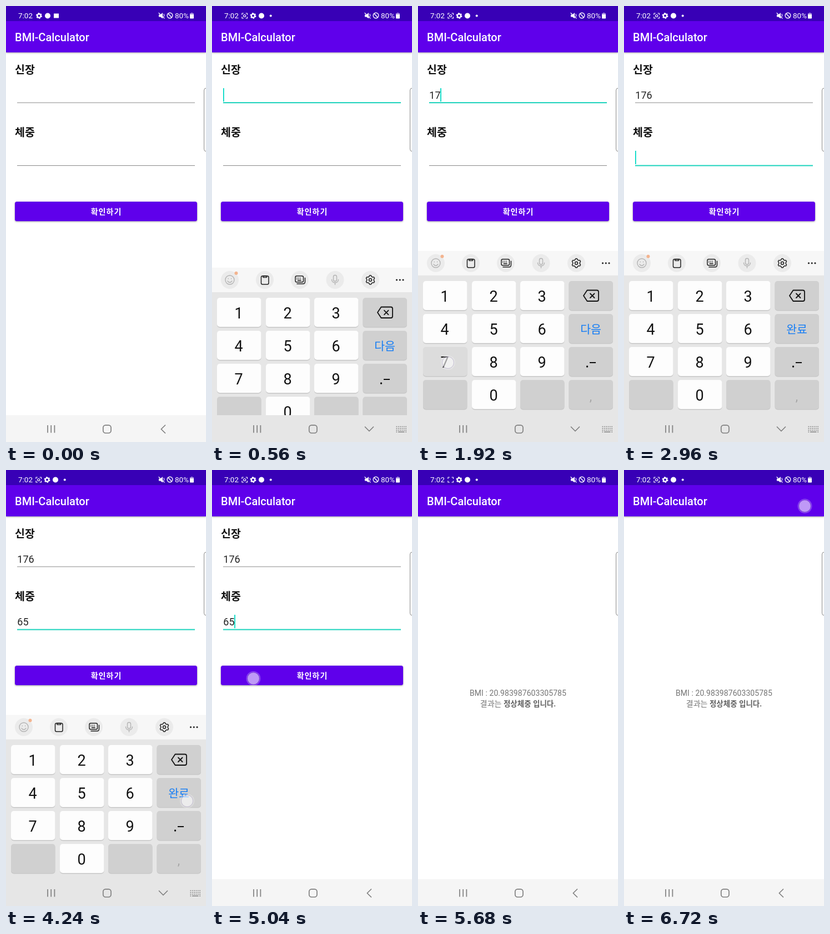
Recreate the animation shown at these times as an HTML page. Size 360x780 px, loop 6960 ms.

```html
<!DOCTYPE html>
<html lang="ko">
<head>
<meta charset="utf-8">
<title>BMI-Calculator</title>
<style>
  html, body { margin: 0; width: 100%; height: 100%; overflow: hidden; background: #fff; }
  svg { display: block; width: 100vw; height: 100vh; }
  text { font-family: Roboto, 'Noto Sans CJK KR', 'Noto Sans CJK JP', 'Noto Sans CJK', sans-serif; }
  .ko { font-family: 'Noto Sans CJK KR', 'Noto Sans CJK JP', 'Noto Sans CJK', sans-serif; }
  .mid { text-anchor: middle; }
  .title { font-size: 20px; font-weight: 500; fill: #fff; }
  .label { font-size: 19.5px; font-weight: 700; fill: #111; }
  .input { font-size: 18px; fill: #222; }
  .status text { font-size: 13.5px; fill: #fff; }
  .digit { font-size: 27px; fill: #111; }
  .result { font-size: 14px; fill: #757575; }
  .line { fill: none; stroke: currentColor; stroke-linecap: round; stroke-linejoin: round; }
  .bar { filter: drop-shadow(0 1px 1.5px rgba(0, 0, 0, .35)); }
</style>
</head>
<body>
<svg viewBox="0 0 360 780" preserveAspectRatio="none">
  <defs>
    <g id="gear">
      <circle r="3.2" fill="none" stroke="#fff" stroke-width="2.4"/>
      <circle r="4.7" fill="none" stroke="#fff" stroke-width="1.6" stroke-dasharray="2.46"/>
    </g>
    <g id="header">
      <rect class="bar" y="27" width="360" height="56" fill="#5f00eb"/>
      <rect width="360" height="27" fill="#3800b6"/>
      <text class="title" x="16" y="62.5">BMI-Calculator</text>
    </g>
  </defs>

  <rect width="360" height="780" fill="#fff"/>

  <g id="form">
    <use href="#header"/>
    <text class="ko label" x="16" y="120.5">신장</text>
    <text class="ko label" x="16" y="233">체중</text>
    <path id="line0" d="M20 173H340"/>
    <path id="line1" d="M20 285.5H340"/>
    <text class="input" id="value0" x="20.3" y="166"></text>
    <text class="input" id="value1" x="20.3" y="278"></text>
    <rect id="caret" width="1.8" height="24" fill="#03dac5"/>
    <rect class="bar" x="16" y="350" width="328" height="35" rx="3.5" fill="#5f00eb"/>
    <text class="ko mid" x="180.6" y="373" font-size="14" font-weight="700" letter-spacing="1.1" fill="#fff">확인하기</text>
  </g>

  <g id="result">
    <rect width="360" height="732" fill="#fff"/>
    <use href="#header"/>
    <text class="result mid" x="180" y="403.5" letter-spacing=".06">BMI : 20.983987603305785</text>
    <text class="result mid" x="180" y="422.5">결과는 <tspan font-size="13.5" font-weight="700" fill="#616161">정상체중 입니다.</tspan></text>
  </g>

  <path d="M361 147H360Q356.500 147 356.500 151V256Q356.500 260 360 260H361" fill="#fff" stroke="#8a8a8a"/>

  <g class="status">
    <text x="22" y="21.700">7:02</text>
    <g id="iconsBefore">
      <use href="#gear" x="59.500" y="17.500"/>
      <circle cx="75" cy="17.500" r="5" fill="#fff"/>
      <rect x="86" y="13.500" width="9" height="8" fill="#fff"/>
    </g>
    <g id="iconsAfter">
      <path class="line" color="#fff" stroke-width="1.200" d="M54 15.500V13H56.500M61 13H63.500V15.500M63.500 19.500V22H61M56.500 22H54V19.500"/>
      <circle id="recDot" cx="58.700" cy="17.500" r="2" fill="none" stroke="#fff" stroke-width="1.200"/>
      <use href="#gear" x="74" y="17.500"/>
      <circle cx="89" cy="17.500" r="5" fill="#fff"/>
      <circle cx="105.700" cy="17.500" r="2" fill="#fff"/>
    </g>
    <path d="M275 15.500H278L282 12V22.500L278 19.500H275Z" fill="#fff"/>
    <path class="line" color="#fff" stroke-width="1.200" d="M275 12.500L285 22M284 14.500Q285.500 17 284 19"/>
    <g fill="none" stroke="#fff" stroke-width="1.400"><circle cx="295" cy="17" r="4.800"/><path d="M291.600 13.600L298.400 20.400"/></g>
    <text x="304" y="21.700">80%</text>
    <path d="M333 12H336V13H338V22H331V13H333Z" fill="#fff" opacity=".55"/>
    <rect x="331" y="15" width="7" height="7.500" rx="1" fill="#fff"/>
  </g>

  <rect y="732" width="360" height="48" fill="#f5f5f5"/>

  <g id="keyboard">
    <rect y="438" width="360" height="44" fill="#f7f7f7"/>
    <rect y="482" width="360" height="298" fill="#e6e6e6"/>
    <g id="tools" fill="#ebebeb"></g>
    <g class="line" color="#b4b4b4" stroke-width="1.400">
      <circle cx="32" cy="460" r="8"/>
      <path d="M28 462Q32 467 36 462M29.300 457.500V458M34.700 457.500V458"/>
      <rect x="218.500" y="451.500" width="6" height="11" rx="3"/>
      <path d="M215.500 459.500Q216 465 221.500 465T227.500 459.500M221.500 465V468.500"/>
    </g>
    <circle cx="43.500" cy="448" r="3" fill="#f3b48f"/>
    <g class="line" color="#222" stroke-width="1.500">
      <rect x="88.500" y="453" width="13.500" height="15" rx="2.500"/>
      <path d="M92 453H98.500V455.500H92Z"/>
      <rect x="150" y="453" width="14.500" height="11" rx="2.500"/>
      <path d="M153 467H164Q167.500 467 167.500 463V456.500M154.500 461H160"/>
      <path d="M153 456.500H162M153 458.700H162" stroke-dasharray=".1 2.900"/>
      <circle cx="285" cy="460" r="2.500"/>
      <path id="cog"/>
    </g>
    <g fill="#222"><circle cx="332.500" cy="460" r="1.600"/><circle cx="338.200" cy="460" r="1.600"/><circle cx="344" cy="460" r="1.600"/></g>
    <g id="keys"></g>
    <g class="line" color="#111" stroke-width="1.800">
      <path d="M304.500 508.500H322Q325 508.500 325 511.500V525Q325 528 322 528H304.500L298 518.300Z"/>
      <path d="M310 514.500L317.500 522M317.500 514.500L310 522"/>
    </g>
    <text class="ko mid" id="action" x="311" y="585.500" font-size="20.500" fill="#157df5"></text>
    <circle cx="304.500" cy="645" r="1.700" fill="#111"/>
    <path d="M309 638H320" stroke="#111" stroke-width="2"/>
    <text class="mid" x="311" y="706" font-size="22" fill="#a5a5a5">,</text>
  </g>

  <rect id="navFill" y="732" width="360" height="48" fill="#e6e6e6"/>
  <g class="line" color="#808080" stroke-width="1.700">
    <path d="M75 750V763.500M81.200 750V763.500M87.400 750V763.500" stroke-linecap="butt"/>
    <rect x="174.800" y="749.800" width="14.200" height="14.200" rx="4.500"/>
    <path id="chevron"/>
    <g id="switcher" stroke-width="1.500" stroke-linecap="butt">
      <path d="M331.500 752.500H350M331.500 755.700H350M331.500 758.900H350" stroke-dasharray="1.700 1.640"/>
      <path d="M331.500 762H333.200M335 762H346.500M348.300 762H350"/>
    </g>
  </g>

  <g id="touch">
    <circle r="12" fill="none" stroke="#fff" stroke-opacity=".25" stroke-width="2"/>
    <circle r="10.500" fill="#fff" fill-opacity=".6" stroke="#a89bc4" stroke-opacity=".5"/>
  </g>
</svg>

<script>
const LOOP = 6960, STEP = 80;
const $ = id => document.getElementById(id);
const set = (id, attrs) => {
  for (const name in attrs) $(id).setAttribute(name, attrs[name]);
};
const show = (id, on) => set(id, { visibility: on ? 'visible' : 'hidden' });
const progress = (t, from, to) => Math.min(1, Math.max(0, (t - from) / (to - from)));
const easeOut = p => 1 - (1 - p) ** 3;
const latest = (t, list) => list.filter(([time]) => time <= t).pop();

const columns = [9, 97, 184, 271.5];
const rows = [492, 551, 610, 669];
const keyLabels = ['123', '456', '789', ' 0 '];
const keyIndex = digit => {
  const row = keyLabels.findIndex(labels => labels.includes(digit));
  return { row, column: keyLabels[row].indexOf(digit) };
};

// Each tap: start, end, x, y and the pressed digit, if any.
const tapDigit = (start, end, digit) => {
  const { row, column } = keyIndex(digit);
  return { start, end, x: columns[column] + 45, y: rows[row] + 28, digit };
};
const taps = [
  { start: 80, end: 320, x: 160, y: 158 },
  tapDigit(1520, 1760, '1'),
  tapDigit(1840, 2080, '7'),
  tapDigit(2160, 2400, '6'),
  { start: 2560, end: 2720, x: 324, y: 577 },
  tapDigit(3360, 3520, '6'),
  tapDigit(3680, 3920, '5'),
  { start: 4240, end: 4400, x: 326, y: 592 },
  { start: 5040, end: 5200, x: 74.5, y: 373 },
  { start: 6720, end: LOOP, x: 325.5, y: 64.5 }
];

// Focus and typing: time, focused field, height, weight.
const edits = [
  [0, -1, '', ''], [340, 0, '', ''],
  [1600, 0, '1', ''], [1920, 0, '17', ''], [2240, 0, '176', ''],
  [2640, 1, '176', ''], [3440, 1, '176', '6'], [3740, 1, '176', '65']
];

function buildKeyboard() {
  let keys = '';
  rows.forEach((y, row) => columns.forEach((x, column) => {
    const label = (keyLabels[row][column] || '').trim();
    const fill = label ? '#fdfdfd' : '#d0d0d0';
    keys += `<rect x="${x}" y="${y + 1}" width="79.5" height="52.5" rx="5" fill="#c8c8c8"/>
      <rect ${label && `id="key${label}"`} x="${x}" y="${y}" width="79.5" height="52" rx="5" fill="${fill}"/>
      <text class="digit mid" x="${x + 39}" y="${y + 36.5}">${label}</text>`;
  }));
  $('keys').innerHTML = keys;
  $('tools').innerHTML = [32, 95, 158, 221.5, 285]
    .map(x => `<circle cx="${x}" cy="460" r="16"/>`).join('');

  const points = Array.from({ length: 48 }, (_, i) => {
    const angle = i * Math.PI / 24;
    const radius = 7.2 + Math.max(-.9, Math.min(.9, 1.6 * Math.cos(6 * angle + Math.PI)));
    return `${285 + radius * Math.cos(angle)} ${460 + radius * Math.sin(angle)}`;
  });
  set('cog', { d: `M${points.join('L')}Z` });
}

function drawForm(t) {
  const [since, focus, ...values] = latest(t, edits);
  values.forEach((value, i) => {
    $('value' + i).textContent = value;
    set('line' + i, {
      stroke: focus === i ? '#1fd3bd' : '#8a8a8a',
      'stroke-width': focus === i ? 2 : 1
    });
  });
  const visible = focus >= 0 && (t - since) % 1000 < 500 && t < 5280;
  set('caret', {
    x: 20 + 10.1 * (values[focus] || '').length,
    y: focus === 1 ? 259 : 147,
    opacity: visible ? 1 : 0
  });
  $('action').textContent = focus === 1 ? '완료' : '다음';
}

function drawKeyboard(t) {
  const raised = easeOut(progress(t, 360, 720)) * (1 - progress(t, 4320, 4640) ** 2);
  const open = t >= 400 && t < 4400;
  set('keyboard', { transform: `translate(0 ${342 * (1 - raised)})` });
  show('keyboard', raised > 0);
  show('navFill', open);
  show('switcher', open);
  set('chevron', { d: open ? 'M275.500 753L283 760.500L290.500 753' : 'M286.500 750L279.300 757L286.500 764' });
}

function drawTouch(t) {
  const tap = taps.find(({ start, end }) => t >= start && t < end);
  for (const digit of '1234567890') set('key' + digit, { fill: '#fdfdfd' });
  if (tap && tap.digit) set('key' + tap.digit, { fill: '#dcdcdc' });
  show('touch', tap);
  if (tap) set('touch', { transform: `translate(${tap.x} ${tap.y})` });
}

function drawScreens(t) {
  const slide = easeOut(progress(t, 5200, 5680));
  set('form', { transform: `translate(${-36 * slide} 0)` });
  set('result', {
    transform: `translate(${36 * (1 - slide)} 0)`,
    opacity: progress(t, 5220, 5380)
  });
}

function draw(now) {
  const t = Math.floor(now % LOOP / STEP) * STEP;
  drawForm(t);
  drawKeyboard(t);
  drawTouch(t);
  drawScreens(t);
  show('iconsBefore', t < 400);
  show('iconsAfter', t >= 400);
  set('recDot', { opacity: t >= 5600 && t < 5920 ? 0 : 1 });
}

buildKeyboard();
const began = performance.now();
const tick = () => {
  draw(performance.now() - began);
  requestAnimationFrame(tick);
};
tick();
</script>
</body>
</html>
```
